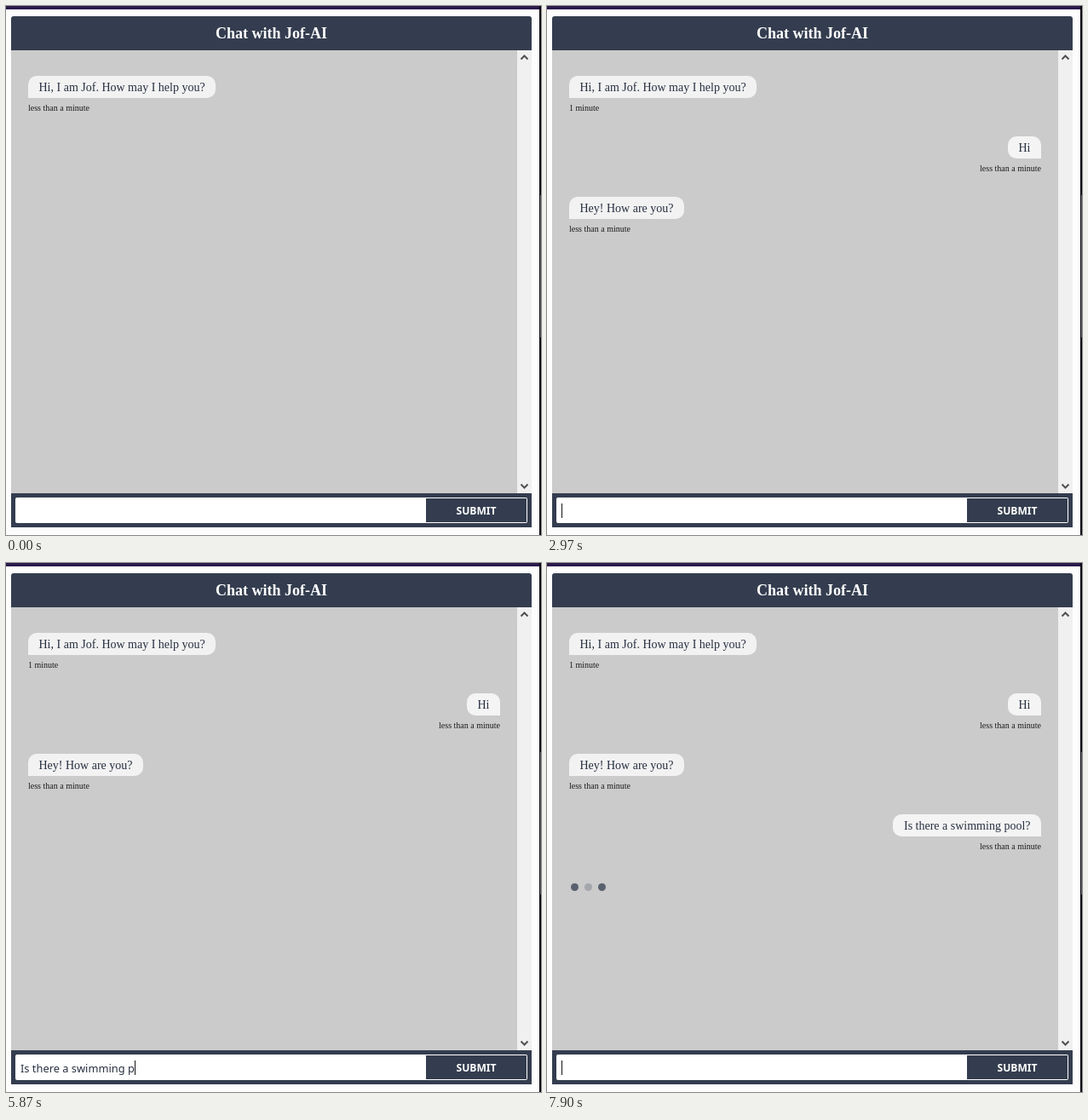
These frames come from a looping animation (628x621 px, 7.99 s). An HTML page:

```html
<!DOCTYPE html>
<html lang="en">
<head>
<meta charset="utf-8">
<title>Chat</title>
<style>
  html, body { margin: 0; width: 100%; height: 100%; overflow: hidden; background: #fdfdfe; }
  body { position: relative; color: #283041; }
  body * { position: absolute; box-sizing: border-box; white-space: pre; }
  .top { left: 0; top: 0; width: 628px; height: 4px; background: #2b1a4a; }
  .edge { left: 626px; top: 0; width: 2px; height: 621px; background: #0e0714; }
  .thumb { left: 1px; top: 222px; width: 1px; height: 167px; background: #686868; }
  h1 { left: 6px; top: 12px; width: 611px; height: 40px; margin: 0; border-radius: 3px 3px 0 0;
    background: #343d4f; color: #fff; text-align: center;
    font: bold 18px/40px "Liberation Serif", "Times New Roman", serif; }
  .log { left: 6px; top: 52px; width: 594px; height: 520px; background: #cbcbcb; }
  .bar { left: 600px; top: 52px; width: 17px; height: 520px; background: #f0f0f0; }
  .bar path { fill: none; stroke: #505050; stroke-width: 2; }
  .msg { left: 20px; width: 554px; height: 60px; font-family: "Liberation Serif", "Times New Roman", serif; }
  .bubble { left: 0; top: 0; height: 26px; padding: 0 12.5px; border-radius: 10px 10px 10px 0;
    background: #f2f2f2; font-size: 14px; line-height: 27px; }
  .age { left: 0; top: 31px; font-size: 10px; line-height: 14px; color: #1c1c1c; }
  .me .bubble { left: auto; right: 0; border-radius: 10px 10px 0 10px; background: #f4f4f4; }
  .me .age { left: auto; right: 0; }
  .dots { left: 20px; width: 50px; height: 10px; }
  .dots i { top: 0; width: 9.4px; height: 9.4px; border-radius: 50%; background: #343d4f; }
  .foot { left: 6px; top: 572px; width: 611px; height: 40px; background: #343d4f; }
  .field { left: 5px; top: 5px; width: 482px; height: 30px; border-radius: 2px 0 0 2px; background: #fff; }
  .typed { left: 6px; top: 0; font: 12.85px/32px "Noto Sans", "Open Sans", sans-serif; }
  .typed span { position: static; }
  .caret { left: 100%; top: 7px; width: 1px; height: 17px; background: #111; }
  .send { left: 487px; top: 5px; width: 119px; height: 30px; border: 1px solid #fff; border-left: 0;
    border-radius: 0 2px 2px 0; color: #fff; text-align: center;
    font: bold 12.1px/30px "Noto Sans", "Open Sans", sans-serif; }
</style>
</head>
<body>
<div class="top"></div>
<div class="edge"><div class="thumb"></div></div>
<h1>Chat with Jof-AI</h1>
<div class="log"></div>
<svg class="bar" width="17" height="520"><path d="M4.5 10.5l4-4 4 4M4.5 509.5l4 4 4-4"/></svg>
<div class="foot">
  <div class="field"><div class="typed"><span></span><div class="caret"></div></div></div>
  <div class="send">SUBMIT</div>
</div>
<script>
const LOOP = 7990, BLINK = 535, FADE = 1200;
const FIRST_SENT = 820, REPLY = 1180, SECOND_SENT = 6770;
const FRESH = "less than a minute";
const log = document.querySelector(".log");
const typed = document.querySelector(".typed span");
const caret = document.querySelector(".caret");

const add = (parent, tag, cls, text = "") => {
  const el = parent.appendChild(document.createElement(tag));
  el.className = cls;
  el.textContent = text;
  return el;
};
const show = (el, on) => { el.style.visibility = on ? "visible" : "hidden"; };

const messages = [
  ["Hi, I am Jof. How may I help you?", "msg", 0],
  ["Hi", "msg me", FIRST_SENT],
  ["Hey! How are you?", "msg", REPLY],
  ["Is there a swimming pool?", "msg me", SECOND_SENT]
].map(([text, cls, at], i) => {
  const el = add(log, "div", cls);
  el.style.top = 30 + 71 * i + "px";
  add(el, "div", "bubble", text);
  return { el, at, age: add(el, "div", "age", FRESH) };
});

const dots = add(log, "div", "dots");
const dot = [0, 1, 2].map(i => {
  const el = add(dots, "i", "");
  el.style.left = 1.8 + 16.1 * i + "px";
  return el;
});

// bursts of typing: start, text, time per key; an empty one only wakes the caret
const bursts = [
  [280, "", 0], [460, "Hi", 180], [FIRST_SENT, "", 0],
  [3150, "I", 0], [3330, "s there ", 90], [4140, "a ", 0],
  [4690, "swi", 180], [5330, "mming ", 72], [5870, "pool?", 157]
];

// text in the field and time of the latest key
function typing(t) {
  const cleared = t < FIRST_SENT ? 0 : t < SECOND_SENT ? FIRST_SENT : SECOND_SENT;
  let text = "", last = Infinity;
  for (const [at, chunk, pace] of bursts) {
    if (t < at) break;
    last = at;
    [...chunk].forEach((char, i) => {
      const time = at + i * pace;
      if (time > t) return;
      last = time;
      if (time >= cleared) text += char;
    });
  }
  return { text, last };
}

// each dot dips to a quarter and back, a third of a period after the one before
const fade = t => t <= 0 ? 1 : 0.25 + 0.75 * Math.abs(1 - 2 * (t % FADE) / FADE);

function draw(t) {
  for (const m of messages) show(m.el, t >= m.at);
  messages[0].age.textContent = t < 460 ? FRESH : "1 minute";

  const { text, last } = typing(t);
  typed.textContent = text;
  show(caret, t >= last && (t - last) % (2 * BLINK) < BLINK);

  const second = t >= SECOND_SENT;
  show(dots, second || (t >= FIRST_SENT && t < REPLY));
  dots.style.top = (second ? 323.8 : 181.8) + "px";
  dot.forEach((el, i) => { el.style.opacity = fade(t - 6900 - i * FADE / 3); });
}

const start = performance.now();
function frame() {
  draw((performance.now() - start) % LOOP);
  requestAnimationFrame(frame);
}
frame();
</script>
</body>
</html>
```
